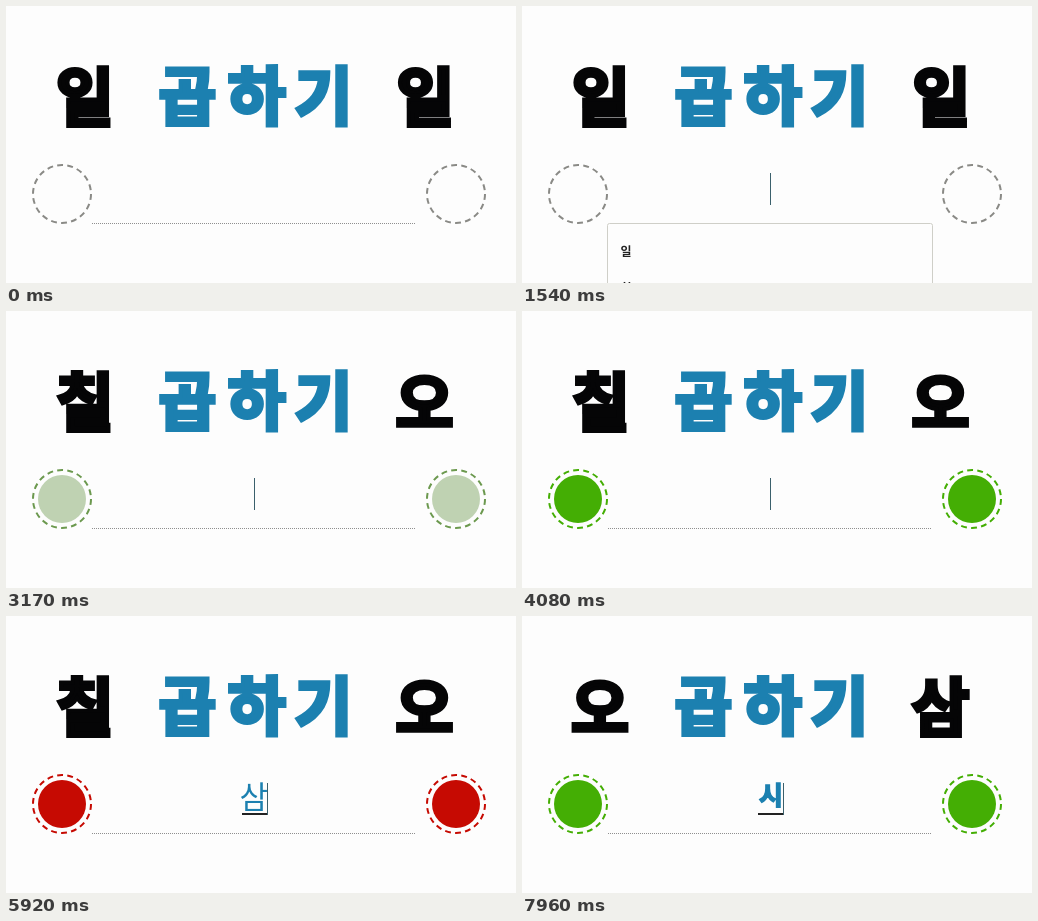
Animation, 510 px wide and 277 px high, one loop 8000 ms. Source, as an HTML page with a canvas:

```html
<!DOCTYPE html>
<html lang="ko">
<head>
<meta charset="utf-8">
<style>
  html, body { margin: 0; width: 100%; height: 100%; overflow: hidden; background: #fdfdfd; }
  canvas { display: block; width: 510px; height: 277px; }
</style>
</head>
<body>
<canvas id="stage"></canvas>
<script>
const W = 510, H = 277, LOOP = 8000;
const PAPER = '#fdfdfd', INK = '#050506', TEAL = '#1c80b0', CARET = '#3b606c';
const IDLE = [138, 138, 134], GREEN = [68, 174, 4], RED = [198, 10, 2];
const FONT = '"Noto Sans CJK KR", "Noto Sans CJK", sans-serif';

const canvas = document.getElementById('stage');
const ctx = canvas.getContext('2d');
const ratio = window.devicePixelRatio || 1;
canvas.width = W * ratio;
canvas.height = H * ratio;
ctx.scale(ratio, ratio);

// Each list holds [start time, value]; the latest started entry applies.
const questions = [[0, '일일'], [2720, '칠오'], [6850, '오삼']];
const typed = [
  [0, ''], [1960, 'ㅇ'], [2130, '이'], [2290, '일'], [2720, ''],
  [4310, 'ㅅ'], [4480, '사'], [4850, ''],
  [5560, 'ㅅ'], [5720, '사'], [5880, '삼'],
  [6130, '삼ㅅ'], [6270, '삼시'], [6390, '삼십'], [6530, '삼십ㅇ'], [6650, '삼십오'],
  [6850, ''], [7780, 'ㅅ'], [7920, '시']
];
const lights = [[0, IDLE], [2720, GREEN], [4850, RED], [6850, GREEN]];
const FOCUS = 250, HOVER = 540, UNHOVER = 1500, CLOSE = 2720;

const current = (list, t) => list.findLast(entry => entry[0] <= t);
const rgb = (c, a = 1) => `rgba(${c.map(Math.round).join(',')},${a})`;

function rect(color, x, y, w, h) {
  ctx.fillStyle = color;
  ctx.fillRect(x, y, w, h);
}

// Draws a syllable with its ink centred on (x, y).
function glyph(char, x, y, size, color, weight = 900, stroke = 0) {
  ctx.font = `${weight} ${size}px ${FONT}`;
  ctx.textAlign = 'left';
  ctx.textBaseline = 'alphabetic';
  const m = ctx.measureText(char);
  const left = x + (m.actualBoundingBoxLeft - m.actualBoundingBoxRight) / 2;
  const base = y + (m.actualBoundingBoxAscent - m.actualBoundingBoxDescent) / 2;
  ctx.fillStyle = ctx.strokeStyle = color;
  ctx.fillText(char, left, base);
  if (stroke) {
    ctx.lineWidth = stroke;
    ctx.lineJoin = 'miter';
    ctx.miterLimit = 3;
    ctx.strokeText(char, left, base);
  }
}

function drawTitle(t) {
  const [a, b] = current(questions, t)[1];
  const big = (char, x, color) => glyph(char, x, 90, 63, color, 900, 4);
  big(a, 78, INK);
  big('곱', 181.5, TEAL);
  big('하', 251.3, TEAL);
  big('기', 315.5, TEAL);
  big(b, 418.5, INK);
}

function drawLights(t) {
  const i = lights.indexOf(current(lights, t));
  const [start, goal] = lights[i];
  const from = i ? lights[i - 1][1] : goal;
  const p = Math.min(1, (t - start) / 1000);
  const k = p * p * (3 - 2 * p);
  const color = goal.map((v, n) => from[n] + (v - from[n]) * k);
  const alpha = i === 0 ? 0 : i === 1 ? k : 1;
  for (const x of [56, 450]) {
    ctx.strokeStyle = rgb(color);
    ctx.lineWidth = 2;
    ctx.setLineDash([5.9, 2 * Math.PI * 29 / 18 - 5.9]);
    ctx.beginPath();
    ctx.arc(x, 188, 29, 0, 2 * Math.PI);
    ctx.stroke();
    ctx.setLineDash([]);
    ctx.fillStyle = rgb(color, alpha);
    ctx.beginPath();
    ctx.arc(x, 188, 24, 0, 2 * Math.PI);
    ctx.fill();
  }
}

function drawCaret(t, x, since) {
  if ((t - since) % 1000 < 560) rect(CARET, x, 167, 1, 32);
}

function drawInput(t) {
  const [since, text] = current(typed, t);
  if (t >= HOVER && t < UNHOVER) {
    rect('#dcf3f2', 86, 148, 324, 69);
    glyph('일', 248, 187, 12.5, '#222', 500);
  }
  const chars = [...text], pitch = 26;
  const left = 248 - chars.length * pitch / 2;
  chars.forEach((char, i) => {
    const x = left + (i + 0.5) * pitch;
    if (char === '삼') glyph(char, x, 180.5, 31, TEAL, 500);
    else glyph(char, x, 179.3, 26, TEAL, 900, 1.5);
  });
  if (text) rect('#222', left + (chars.length - 1) * pitch + 1, 197, pitch - 1, 2);
  if (t >= FOCUS) drawCaret(t, left + chars.length * pitch, Math.max(since, FOCUS));
}

function drawMenu(t) {
  ctx.lineWidth = 1;
  if (t < FOCUS || t >= CLOSE) {
    ctx.strokeStyle = '#8f8f8f';
    ctx.setLineDash([1, 1]);
    ctx.beginPath();
    ctx.moveTo(86, 217.5);
    ctx.lineTo(410, 217.5);
    ctx.stroke();
    ctx.setLineDash([]);
    return;
  }
  ctx.strokeStyle = '#cfcfc8';
  ctx.beginPath();
  ctx.roundRect(85.5, 217.5, 325, 80, 2);
  ctx.stroke();
  if (t >= HOVER && t < UNHOVER) rect('#bfbfbc', 86, 227, 324, 36);
  const rows = current(typed, t)[1] ? ['일', '일이삼'] : ['일', '칠'];
  rows.forEach((row, r) => [...row].forEach((char, i) =>
    glyph(char, 103.5 + i * 11.3, 245 + r * 36, 12, '#222', 700)));
}

function draw() {
  const t = performance.now() % LOOP;
  rect(PAPER, 0, 0, W, H);
  drawTitle(t);
  drawLights(t);
  drawMenu(t);
  drawInput(t);
  requestAnimationFrame(draw);
}
draw();
</script>
</body>
</html>
```
